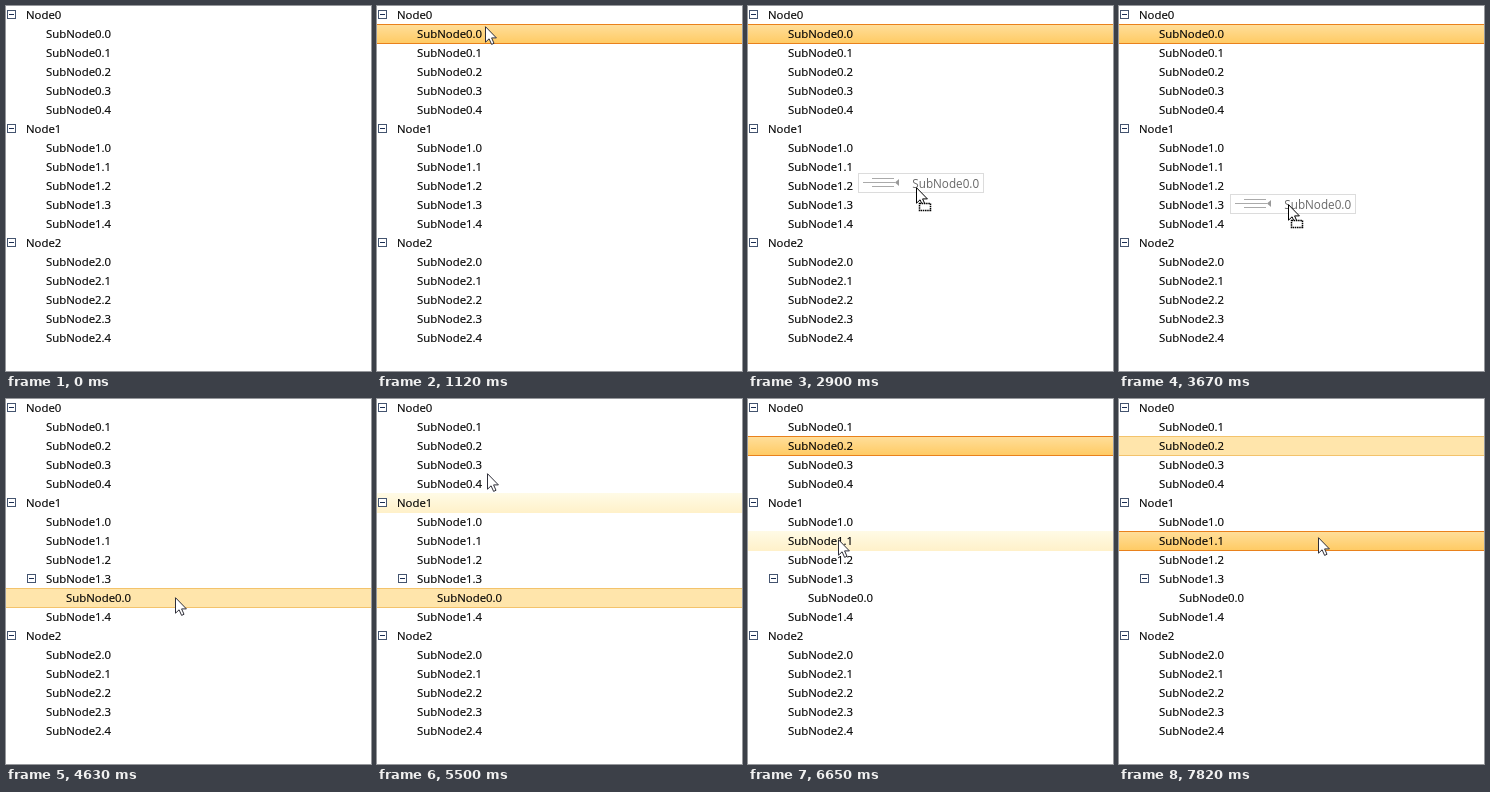
Recreate the animation shown at these times as an HTML page. Size 365 px wide and 365 px high, loop 8000 ms.

```html
<!DOCTYPE html>
<html lang="en">
<head>
<meta charset="utf-8">
<title>Tree drag and drop</title>
<style>
  html, body { margin: 0; width: 100%; height: 100%; overflow: hidden; background: #fff; }
  svg { display: block; width: 100vw; height: 100vh; }
  text { font: 11.4px "Open Sans", "Noto Sans", sans-serif; fill: #000; stroke: #000; stroke-width: .15px; }
  .box { fill: #fff; stroke: #44546f; }
  .minus { stroke: #1c2f55; }
  .ghost text { font-size: 11.7px; fill: #686868; stroke: none; }
</style>
</head>
<body>
<svg viewBox="0 0 365 365">
  <defs>
    <linearGradient id="strongFill" x2="0" y2="1">
      <stop stop-color="#ffdf9c"/><stop offset="1" stop-color="#ffca62"/>
    </linearGradient>
    <linearGradient id="hoverFill" x2="0" y2="1">
      <stop stop-color="#fffbe6"/><stop offset="1" stop-color="#fff1c9"/>
    </linearGradient>
  </defs>
  <g id="hover"><rect width="365" height="20" fill="url(#hoverFill)"/></g>
  <g id="light">
    <rect width="365" height="20" fill="#ffe5ab"/>
    <path d="M0 .5H365M0 19.5H365" stroke="#f3c36c"/>
  </g>
  <g id="strong">
    <rect width="365" height="20" fill="url(#strongFill)"/>
    <path d="M0 .5H365M0 19.5H365" stroke="#e9811c"/>
  </g>
  <g id="before"></g>
  <g id="after"></g>
  <g id="ghost" class="ghost">
    <rect x=".5" y=".5" width="125" height="19" fill="#fff" fill-opacity=".85" stroke="#dcdcdc"/>
    <path d="M5 9.5H37M14 5.5H36M14 13.5H36" stroke="#aaa" fill="none" shape-rendering="crispEdges"/>
    <path d="M41 6V13L37 9.5Z" fill="#999"/>
    <text x="54.3" y="14.7">SubNode0.0</text>
  </g>
  <g id="cursor">
    <path id="arrow" d="M.5 .7V16.2L4.1 12.8L6.6 18.4L9 17.3L6.6 11.9H11.4Z" fill="#fff" stroke-linejoin="round"/>
    <rect id="dropMark" x="3.5" y="16.5" width="11" height="7" fill="#fff" stroke="#000" stroke-width="1.5" stroke-dasharray="1.5 .7"/>
  </g>
</svg>
<script>
// The screen refreshes in ticks; all event times below are counted in them.
const LOOP = 8000, TICK = 140, ROW = 19;
const DRAG_START = 15, DROP = 33;
const LAG = .42; // hover and drag label trail the pointer

const ENTRY = { tick: 1, x: 333, y: 78 };
const MOVES = [
  { from: 1, to: 4, x: 110, y: 49 },
  { from: 4, to: 7, x: 108, y: 20 },
  { from: 9, to: 10, x: 139, y: 20 },
  { from: 13, to: 14, x: 142, y: 26 },
  { from: 14, to: 16, x: 162, y: 108 },
  { from: 16, to: 23, x: 169, y: 198 },
  { from: 38, to: 39, x: 110, y: 74 },
  { from: 39, to: 43, x: 97, y: 47 },
  { from: 43, to: 44, x: 88, y: 106 },
  { from: 44, to: 47, x: 90, y: 140 },
  { from: 53, to: 55, x: 199, y: 138 }
];
const SELECTIONS = [
  { tick: 8, strong: 1 },
  { tick: DROP, light: 10 },
  { tick: 43, strong: 2 },
  { tick: 50, strong: 7, light: 2 }
];

const byId = id => document.getElementById(id);
const easeOut = p => 1 - (1 - p) ** 2;
const rowAt = y => Math.floor((y + 1) / ROW);

function show(id, on) {
  byId(id).setAttribute('display', on ? 'inline' : 'none');
}

function place(id, x, y) {
  byId(id).setAttribute('transform', `translate(${Math.round(x)} ${Math.round(y)})`);
}

function pointerAt(tick) {
  let { x, y } = ENTRY;
  for (const move of MOVES) {
    if (tick <= move.from) break;
    const p = easeOut(Math.min(1, (tick - move.from) / (move.to - move.from)));
    x += (move.x - x) * p;
    y += (move.y - y) * p;
  }
  return { x, y };
}

function drawTree(id, rows) {
  byId(id).innerHTML = rows.map(({ label, depth, open }, i) => {
    const x = depth * 20, y = i * ROW;
    const expander = open ? `<g shape-rendering="crispEdges">
      <rect class="box" x="${x + 1.5}" y="${y + 4.5}" width="8" height="8"/>
      <path class="minus" d="M${x + 3} ${y + 8.5}h5"/></g>` : '';
    return `${expander}<text x="${x + 20}" y="${y + 13}">${label}</text>`;
  }).join('');
}

function moveInto(rows, label, parentLabel) {
  return rows.filter(row => row.label !== label).flatMap(row =>
    row.label === parentLabel
      ? [{ ...row, open: true }, { label, depth: row.depth + 1 }]
      : [row]);
}

function placeBar(id, row) {
  show(id, row !== undefined);
  if (row !== undefined) place(id, 0, row * ROW - 1);
}

function render(t) {
  const tick = Math.floor(t / TICK);
  const dragging = tick >= DRAG_START && tick < DROP;
  const present = tick >= ENTRY.tick;
  const pointer = pointerAt(tick), trail = pointerAt(tick - LAG);
  const { strong, light } = SELECTIONS.findLast(s => s.tick <= tick) ?? {};
  const hovered = rowAt(trail.y);
  // Hovering starts once the pointer has come in over the labels
  const hovering = tick > MOVES[0].to && !dragging && hovered !== strong && hovered !== light;

  show('before', tick < DROP);
  show('after', tick >= DROP);
  placeBar('strong', strong);
  placeBar('light', light);
  placeBar('hover', hovering ? hovered : undefined);

  show('cursor', present);
  show('ghost', dragging);
  show('dropMark', dragging);
  byId('arrow').setAttribute('stroke', dragging ? '#000' : '#2e2e38');
  place('cursor', pointer.x, pointer.y);
  place('ghost', pointer.x - 58, trail.y - 10);
}

const tree = [0, 1, 2].flatMap(n => [
  { label: `Node${n}`, depth: 0, open: true },
  ...[0, 1, 2, 3, 4].map(s => ({ label: `SubNode${n}.${s}`, depth: 1 }))
]);
drawTree('before', tree);
drawTree('after', moveInto(tree, 'SubNode0.0', 'SubNode1.3'));

const start = performance.now();
function loop() {
  render((performance.now() - start) % LOOP);
  requestAnimationFrame(loop);
}
loop();
</script>
</body>
</html>
```
